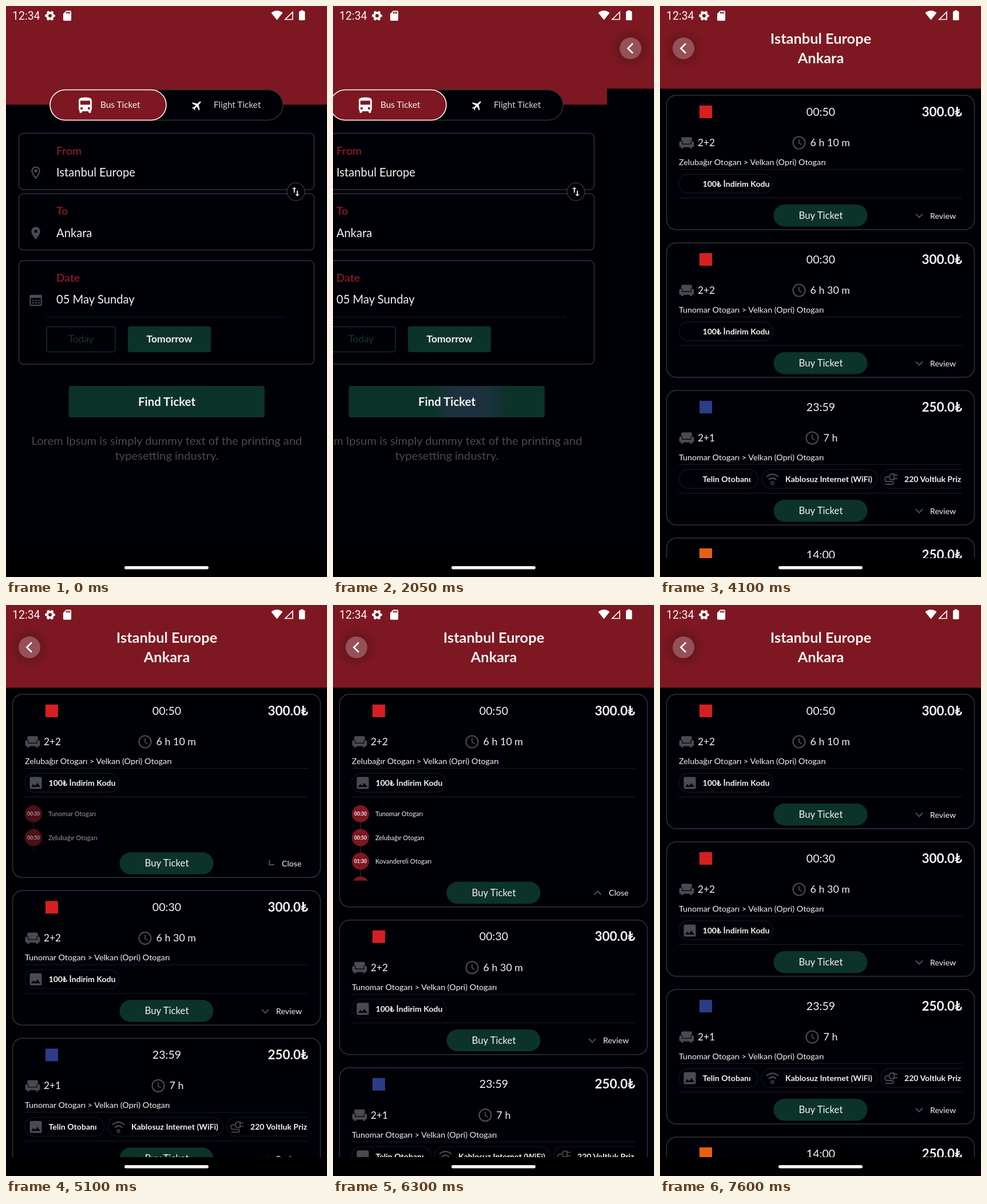
An HTML page that plays this animation: 561 by 998 pixels, repeating every 7.65 s.

```html
<!DOCTYPE html>
<html lang="en">
<head>
<meta charset="utf-8">
<style>
html, body { margin: 0; width: 100%; height: 100%; overflow: hidden; background: #000007; }
svg { display: block; width: 100vw; height: 100vh; }
text { font-family: Lato, "Noto Sans", sans-serif; fill: #f4f4f4; }
.line { fill: none; stroke: #333336; stroke-width: 1.5; }
.rule { stroke: #1c1c22; stroke-width: 1; }
.chip { fill: none; stroke: #0a1820; stroke-width: 1.3; }
.red { fill: #7d1822; }
.green { fill: #0c3329; }
.gray { fill: #4b4a50; }
.stroke { fill: none; stroke: #4b4a50; stroke-width: 2.2; }
.white { fill: #fff; }
</style>
</head>
<body>
<svg id="stage" viewBox="0 0 561 998"></svg>
<script>
const LOOP = 7650, STEP = 50, EXTRA = 136.7;
const icons = {
  bus: 'M4 16c0 .88.39 1.67 1 2.22V20c0 .55.45 1 1 1h1c.55 0 1-.45 1-1v-1h8v1c0 .55.45 1 1 1h1c.55 0 1-.45 1-1v-1.78c.61-.55 1-1.34 1-2.22V6c0-3.5-3.58-4-8-4s-8 .5-8 4v10zm3.5 1a1.5 1.5 0 010-3 1.5 1.5 0 010 3zm9 0a1.5 1.5 0 010-3 1.5 1.5 0 010 3zm1.5-6H6V6h12v5z',
  plane: 'M21 16v-2l-8-5V3.5c0-.83-.67-1.5-1.5-1.5S10 2.67 10 3.5V9l-8 5v2l8-2.5V19l-2 1.5V22l3.5-1 3.5 1v-1.5L13 19v-5.5l8 2.5z',
  pin: 'M12 2C8.13 2 5 5.13 5 9c0 5.25 7 13 7 13s7-7.75 7-13c0-3.87-3.13-7-7-7zm0 9.5a2.5 2.5 0 010-5 2.5 2.5 0 010 5z',
  pinLine: 'M12 2C8.13 2 5 5.13 5 9c0 5.25 7 13 7 13s7-7.75 7-13c0-3.87-3.13-7-7-7zM7 9c0-2.76 2.24-5 5-5s5 2.24 5 5c0 2.88-2.88 7.19-5 9.88C9.92 16.21 7 11.85 7 9zm5 2.5a2.5 2.5 0 010-5 2.5 2.5 0 010 5z',
  card: 'M18 2h-8L4.02 8 4 20c0 1.1.9 2 2 2h12c1.1 0 2-.9 2-2V4c0-1.1-.9-2-2-2zm-6 6h-2V4h2v4zm3 0h-2V4h2v4zm3 0h-2V4h2v4z',
  swap: 'M9 3L5 6.99h3V14h2V6.99h3L9 3zm7 14.01V10h-2v7.01h-3L15 21l4-3.99h-3z',
  seat: 'M21 10c-1.1 0-2 .9-2 2v3H5v-3c0-1.1-.9-2-2-2s-2 .9-2 2v5c0 1.1.9 2 2 2h1v2h3v-2h10v2h3v-2h1c1.1 0 2-.9 2-2v-5c0-1.1-.9-2-2-2zm-3-6H6c-1.1 0-2 .9-2 2v3.15c1.16.41 2 1.51 2 2.82V14h12v-2.03c0-1.3.84-2.4 2-2.82V6c0-1.1-.9-2-2-2z',
  image: 'M21 19V5c0-1.1-.9-2-2-2H5c-1.1 0-2 .9-2 2v14c0 1.1.9 2 2 2h14c1.1 0 2-.9 2-2zM8.5 13.5l2.5 3.01L14.5 12l4.5 6H5l3.5-4.5z',
  calendar: 'M4 3h16a2 2 0 012 2v14a2 2 0 01-2 2H4a2 2 0 01-2-2V5a2 2 0 012-2zm0 5v11h16V8zm2 3h3v2H6zm5 0h3v2h-3zm5 0h2.5v2H16zM6 15h3v2H6zm5 0h3v2h-3zm5 0h2.5v2H16z'
};

// Drawing helpers; y in text() is the baseline
const text = (s, x, y, size, o = {}) =>
  `<text x="${x}" y="${y}" font-size="${size}" font-weight="${o.w || 400}" text-anchor="${o.a || 'start'}" style="fill:${o.c || '#f4f4f4'}">${s}</text>`;
const mid = (s, x, y, size, o) => text(s, x, y, size, { a: 'middle', ...o });
const box = (x, y, x2, y2, r, cls, extra = '') =>
  `<rect x="${x}" y="${y}" width="${x2 - x}" height="${y2 - y}" rx="${r}" class="${cls}" ${extra}/>`;
const dot = (x, y, r, cls, extra = '') => `<circle cx="${x}" cy="${y}" r="${r}" class="${cls}" ${extra}/>`;
const path = (d, cls, extra = '') => `<path d="${d}" class="${cls}" ${extra}/>`;
const icon = (name, x, y, k, cls = 'gray', turn = 0) =>
  path(icons[name], cls, `fill-rule="evenodd" transform="translate(${x} ${y}) rotate(${turn}) scale(${k}) translate(-12 -12)"`);
const rule = (x, y, x2) => path(`M${x} ${y}H${x2}`, 'rule');

function home() {
  const field = (label, value, y) =>
    text(label, 88, y, 19.2, { w: 700, c: '#7d1822' }) + text(value, 88, y + 38.5, 20.2);
  return box(0, 0, 561, 172.5, 0, 'red') +
    box(77, 146.5, 484, 199.5, 26.5, 'line', 'style="fill:#000007"') +
    box(77, 146.5, 280, 199.5, 26.5, 'red', 'stroke="#fff" stroke-width="1.6"') +
    icon('bus', 138.5, 174, 1.43, 'white') + text('Bus Ticket', 165, 178, 15.4) +
    icon('plane', 334, 174, .92, 'white', 45) + text('Flight Ticket', 363, 178, 15.4, { c: '#d8d8da' }) +
    box(22.5, 222.5, 538.5, 321, 8, 'line') + box(22.5, 328, 538.5, 426.5, 8, 'line') +
    box(22.5, 445, 538.5, 626, 8, 'line') +
    field('From', 'Istanbul Europe', 259.5) + field('To', 'Ankara', 365) + field('Date', '05 May Sunday', 481.5) +
    icon('pinLine', 52, 291.5, 1.1) + icon('pin', 52, 397, 1.1) + icon('calendar', 52, 514.5, 1.08) +
    dot(506.5, 324.5, 15.5, 'line', 'style="fill:#000007"') + icon('swap', 506.5, 324.5, .88, 'white') +
    rule(71, 544, 490) +
    box(71, 560.5, 191, 604.5, 4, 'line', 'style="stroke:#0c3329"') +
    mid('Today', 131, 588, 17, { c: '#12382e' }) +
    box(213, 560, 358, 605, 4, 'green') + mid('Tomorrow', 285.5, 588, 17.5, { w: 700 }) +
    box(109.5, 664, 452, 719, 4, 'green') +
    `<g clip-path="url(#button)">${dot(319, 692, 0, '', 'id="ripple" fill="url(#glow)"')}</g>` +
    mid('Find Ticket', 281, 698.5, 20.4, { w: 700 }) +
    mid('Lorem Ipsum is simply dummy text of the printing and', 281, 767, 20.15, { c: '#4a4a4e' }) +
    mid('typesetting industry.', 281, 793, 20.15, { c: '#4a4a4e' });
}

const wifi = path('M186 823q10.5-9 21 0M190 828q6.5-6 13 0', 'stroke') + dot(196.5, 834, 2.4, 'stroke', 'style="stroke-width:1.5"');
const plug = path('M409 818h-3q-5 0-5 5t5 5h3zM409 820h6M409 826h6M401 823h-4q-4 0-4 4t4 4h7q4 0 4 2.5t-4 2.5h-10', 'stroke', 'style="stroke-width:1.8"');

function chip(x, x2, label, art) {
  return box(x, 294, x2, 327, 16.5, 'chip') + art + text(label, x + 41.5, 316, 14.1, { w: 700 });
}

const picture = `<g class="picture">${icon('image', 52, 311, 1.17)}</g>`;
const lift = art => `<g transform="translate(0 -516)">${art}</g>`;
const code = chip(33, 197, '100₺ İndirim Kodu', picture);
const services = chip(33, 171.5, 'Telin Otobanı', picture) +
  chip(177.5, 379.5, 'Kablosuz Internet (WiFi)', lift(wifi)) +
  chip(385.5, 560, '220 Voltluk Priz', lift(plug));

// Each trip is drawn at the first slot and moved down by its index
const trips = [
  { logo: '#d51f22', time: '00:50', price: '300.0', seats: '2+2', span: '6 h 10 m', from: 'Zelubağır', chips: code },
  { logo: '#d51f22', time: '00:30', price: '300.0', seats: '2+2', span: '6 h 30 m', from: 'Tunomar', chips: code },
  { logo: '#2c3c86', time: '23:59', price: '250.0', seats: '2+1', span: '7 h', from: 'Tunomar', chips: services },
  { logo: '#e8600f', time: '14:00', price: '250.0', seats: '2+1', span: '7 h', from: 'Tunomar', chips: code }
];
const stops = [['00:30', 'Tunomar'], ['00:50', 'Zelubağır'], ['01:30', 'Kovandereli'], ['02:00', 'Zelubağır']];

function trip(p, i) {
  const cx = p.span.length > 4 ? 243 : 266;
  const stopList = path('M48 365V490', '', 'stroke="#3a1a20" stroke-width="1.5"') + stops.map(([time, name], n) => {
    const y = 365 + n * 41.5;
    return dot(48, y, 15, 'red') + mid(time, 48, y + 3, 8.6, { w: 700 }) + text(name + ' Otogarı', 74, y + 4, 11.2);
  }).join('');
  return `<g class="trip">
    ${box(11.5, 156, 549.5, 391, 17, 'line frame')}
    ${box(69, 174, 91, 196, 0, '', `fill="${p.logo}"`)}
    ${mid(p.time, 281, 191.5, 19.6)}
    ${text(p.price + '₺', 528, 192.5, 22.5, { w: 700, a: 'end' })}
    ${icon('seat', 46.5, 238.5, 1.17)}${text(p.seats, 66, 245, 17.2)}
    ${dot(cx, 239, 10.5, 'stroke')}${path(`M${cx} 233v6.5l4.5 3`, 'stroke', 'style="stroke-width:1.8"')}
    ${text(p.span, cx + 19.5, 245, 17.9)}
    ${text(p.from + ' Otogarı &gt; Velkan (Opri) Otogarı', 33, 278, 14.3)}
    ${rule(33, 285.5, 528)}<g clip-path="url(#row)">${p.chips}</g>${rule(33, 335.5, 528)}
    ${i ? '' : `<g id="stops" clip-path="url(#fold)">${stopList}</g>`}
    <g class="foot">
      ${box(198.5, 347, 362.5, 385.5, 19.2, 'green')}${mid('Buy Ticket', 281, 372, 16.8)}
      ${path('M-6-3L0 3L6-3', 'stroke chevron', 'transform="translate(453 366.5)"')}
      <g class="label">${text('Review', 472, 371.5, 14.2)}</g>
    </g></g>`;
}

function results() {
  return box(0, 0, 561, 998, 0, '', 'fill="#000007"') +
    path('', '', 'id="spinner" fill="none" stroke="#0c3329" stroke-width="5" stroke-linecap="square"') +
    `<g id="list">${trips.map(trip).join('')}</g>` +
    box(0, 0, 561, 144.5, 0, 'red') +
    dot(41, 74, 38, '', 'fill="url(#shade)"') + dot(41, 74, 19, '', 'fill="#955058"') +
    path('M45 65.5L36.5 74L45 82.5', '', 'fill="none" stroke="#fff" stroke-width="2.7"') +
    mid('Istanbul Europe', 281, 66, 25.4, { w: 700 }) + mid('Ankara', 281, 99.5, 25.4, { w: 700 });
}

function system() {
  return `<text x="11" y="24" font-size="19.5" style="font-family:Roboto,sans-serif">12:34</text>` +
    dot(77, 17, 5, '', 'fill="none" stroke="#fff" stroke-width="4"') +
    dot(77, 17, 7.3, '', 'fill="none" stroke="#fff" stroke-width="3" stroke-dasharray="4 3.645" stroke-dashoffset="2"') +
    icon('card', 107, 17, .88, 'white') +
    path('M463.5 12Q473.5 4 483.5 12L473.5 24.5Z', 'white') +
    path('M501 10.5V23.5H488Z', '', 'fill="none" stroke="#fff" stroke-width="1.7"') +
    box(512, 9, 522.5, 25, 1.5, 'white') + box(515, 7.5, 519.5, 10, 0, 'white') +
    box(0, 965, 561, 998, 0, '', 'fill="#000"') + box(207, 979, 354, 984.5, 2.7, '', 'fill="#f4f4f4"');
}

const stage = document.getElementById('stage');
stage.innerHTML = `<defs>
  <clipPath id="button">${box(109.5, 664, 452, 719, 4, '')}</clipPath>
  <clipPath id="row">${box(30, 290, 528, 330, 0, '')}</clipPath>
  <clipPath id="fold"><rect id="window" x="20" y="345" width="510"/></clipPath>
  <radialGradient id="glow"><stop stop-color="#262f46"/><stop offset=".6" stop-color="#26304a" stop-opacity=".7"/><stop offset="1" stop-color="#26304a" stop-opacity="0"/></radialGradient>
  <radialGradient id="shade"><stop offset=".45" stop-opacity=".16"/><stop offset="1" stop-opacity="0"/></radialGradient>
</defs><g id="home">${home()}</g><g id="results">${results()}</g>${system()}`;

const $ = id => document.getElementById(id);
const el = Object.fromEntries(['home', 'results', 'ripple', 'spinner', 'list', 'stops', 'window'].map(id => [id, $(id)]));
const cards = [...stage.querySelectorAll('.trip')];
const pictures = [...stage.querySelectorAll('.picture')];
const first = name => cards[0].querySelector(name);
const [frame, foot, chevron, label] = ['.frame', '.foot', '.chevron', '.label'].map(first);
const labelText = label.firstElementChild;

const clamp = v => Math.min(1, Math.max(0, v));
const part = (t, start, length) => clamp((t - start) / length);
const smooth = p => p * p * (3 - 2 * p);
const move = (node, x, y) => node.setAttribute('transform', `translate(${x} ${y})`);
const show = (node, on) => node.setAttribute('visibility', on ? 'visible' : 'hidden');

// Cubic bezier .4,0 .2,1 solved by bisection
function swift(x) {
  let a = 0, b = 1;
  for (let i = 0; i < 20; i++) {
    const s = (a + b) / 2, r = 1 - s;
    if (1.2 * r * r * s + .6 * r * s * s + s ** 3 < x) a = s; else b = s;
  }
  return 3 * (1 - a) * a * a + a ** 3;
}

function drawSpinner(t) {
  const time = Math.max(0, t - 2065), phase = time / 1333 % 1;
  const head = swift(clamp(phase * 2)), tail = swift(clamp(phase * 2 - 1));
  const start = (-74 + tail * 270 + time / 2222 * 360 + phase * 90) * Math.PI / 180;
  const sweep = Math.max(.001, (head - tail) * 1.5 * Math.PI);
  const at = a => `${281 + 30 * Math.cos(a)} ${555 + 30 * Math.sin(a)}`;
  el.spinner.setAttribute('d', `M${at(start)}A30 30 0 ${sweep > Math.PI ? 1 : 0} 1 ${at(start + sweep)}`);
}

function draw(t) {
  const slide = 561 * (1 - (1 - part(t, 2027.2, 300)) ** 2);
  move(el.home, -slide, 0);
  move(el.results, 561 - slide, 0);
  el.ripple.setAttribute('r', Math.max(0, (t - 1850) * .33));
  el.ripple.setAttribute('opacity', .8 * part(t, 1850, 100));

  const loaded = t >= 4050;
  show(el.spinner, !loaded);
  show(el.list, loaded);
  if (!loaded) drawSpinner(t);
  pictures.forEach(p => p.setAttribute('opacity', t < 4400 ? 0 : 1));

  const opening = part(t, 4950, 257), closing = part(t, 6580, 257);
  const open = smooth(opening) - smooth(closing), extra = EXTRA * open;
  cards.forEach((card, i) => move(card, 0, i * 258 + (i ? extra : 0)));
  frame.setAttribute('height', 235 + extra);
  move(foot, 0, extra);
  el.window.setAttribute('height', extra);
  el.stops.setAttribute('opacity', open);

  const close = opening > 0 && closing === 0;
  const angle = 180 * (opening ** 2.5 - closing ** 2.5);
  chevron.setAttribute('transform', `translate(${close ? 462.5 : 453} 366.5) rotate(${angle})`);
  labelText.textContent = close ? 'Close' : 'Review';
  labelText.setAttribute('x', close ? 482 : 472);
}

const begin = performance.now();
function tick() {
  const t = (performance.now() - begin + 4) % LOOP;
  draw(Math.floor(t / STEP) * STEP);
  requestAnimationFrame(tick);
}
tick();
</script>
</body>
</html>
```
